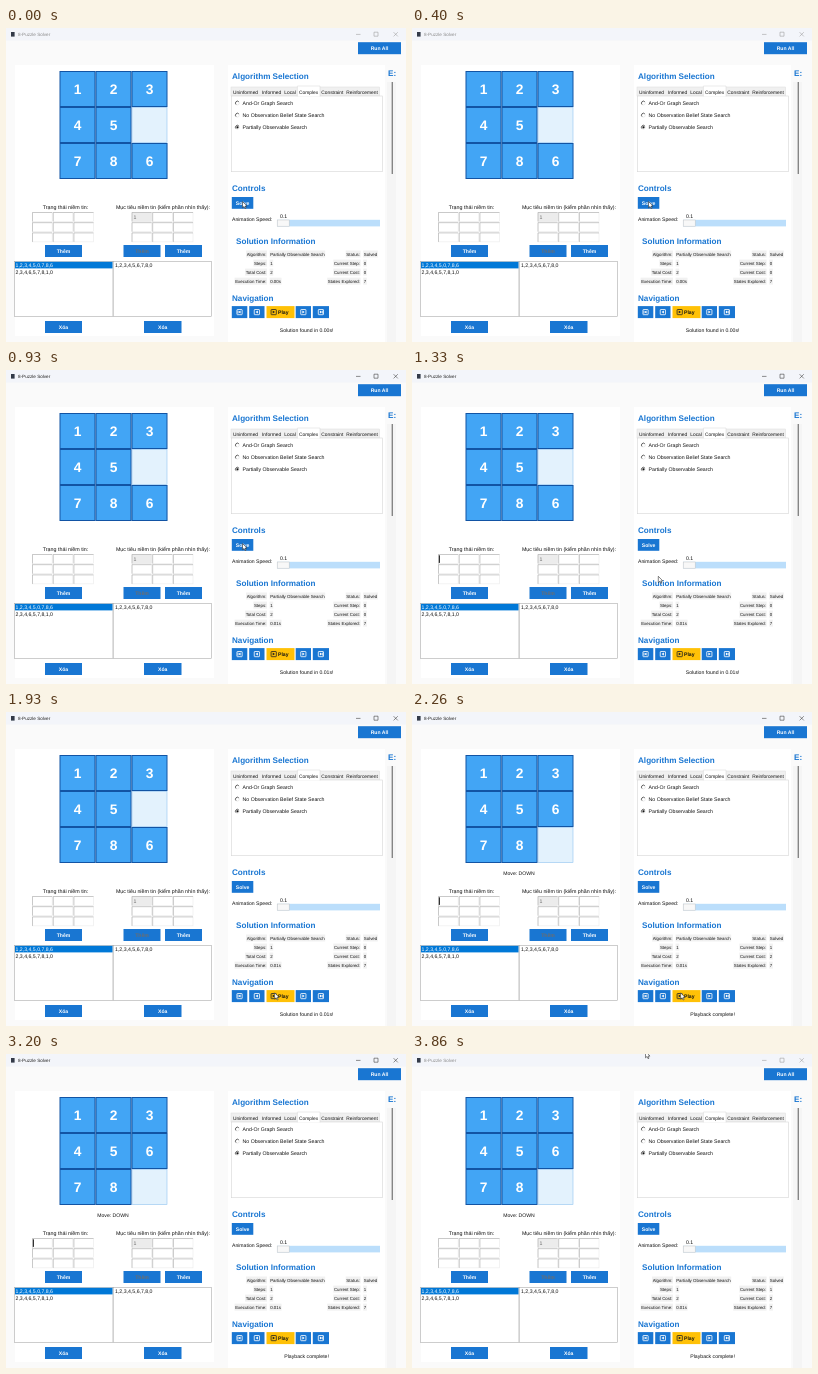
Animation, 400 px wide and 314 px high, one loop 3930 ms. Source, as an HTML page:

```html
<!DOCTYPE html>
<html lang="vi">
<head>
<meta charset="utf-8">
<title>8-Puzzle Solver</title>
<style>
  html, body { margin: 0; width: 100%; height: 100%; overflow: hidden; background: #fafafa; }
  svg { display: block; width: 100%; height: 100%; }
  text { font-family: "Liberation Sans", Arial, sans-serif; text-rendering: geometricPrecision; white-space: pre; }
</style>
</head>
<body>
<svg id="stage" viewBox="0 0 400 314"></svg>
<script>
const LOOP = 3930;
const BLUE = '#1976d2', INK = '#111', NAVY = '#1254a4';
const stage = document.getElementById('stage');

function add(tag, attrs, parent = stage) {
  const el = document.createElementNS('http://www.w3.org/2000/svg', tag);
  for (const key in attrs) el.setAttribute(key, attrs[key]);
  parent.appendChild(el);
  return el;
}
const rect = (x, y, width, height, fill, more = {}, parent) =>
  add('rect', { x, y, width, height, fill, ...more }, parent);
const path = (d, more, parent) => add('path', { d, fill: 'none', ...more }, parent);

function label(str, x, y, { size = 5.2, fill = INK, anchor = 'start', weight = 400 } = {}, parent) {
  const el = add('text', { x, y, fill, 'font-size': size, 'text-anchor': anchor, 'font-weight': weight }, parent);
  el.textContent = str;
  return el;
}
const heading = (str, x, y) => label(str, x, y, { size: 8.15, fill: BLUE, weight: 700 });

function button(str, x, y, w, h = 12, fill = '#fff') {
  rect(x, y, w, h, BLUE);
  label(str, x + w / 2, y + h / 2 + 1.8, { size: 5.1, fill, anchor: 'middle', weight: 700 });
}

// Title bar
rect(0, 0, 400, 12.5, '#f3f5fa');
rect(5, 4, 3.6, 4.6, '#333a48');
const title = label('8-Puzzle Solver', 12, 8.2, { size: 4.6 });
const winIcons = path('M350 6.4h4.5M368 4.2h4v4h-4zM387.6 4.2l4.2 4.2M391.8 4.2l-4.2 4.2', { 'stroke-width': .55 });

// Panels
rect(9, 37, 199, 271, '#fff');
rect(222, 37, 157, 277, '#fff');
button('Run All', 352, 14.2, 43, 12);
heading('E:', 382, 48.4);
rect(381, 54, 9, 260, '#f5f5f5');
rect(385.6, 54, 1.4, 92, '#858585');

// Board
const cell = n => [54 + (n % 3) * 36, 43.5 + Math.floor(n / 3) * 36];
for (const n of [5, 8]) rect(...cell(n), 35, 35, '#e3f2fd', { stroke: '#90c4f0', 'stroke-width': .6 });
function tile(n, value) {
  const g = add('g', {});
  const [x, y] = cell(n);
  rect(x, y, 35, 35, '#42a5f5', { stroke: NAVY, 'stroke-width': 1 }, g);
  label(value, x + 17.5, y + 22.4, { size: 13.8, fill: '#fff', anchor: 'middle', weight: 700 }, g);
  return g;
}
[1, 2, 3, 4, 5, 0, 7, 8].forEach((v, n) => v && tile(n, v));
const sixUp = tile(5, 6), sixDown = tile(8, 6);
const moveText = label('Move: DOWN', 107, 163, { size: 5.1, anchor: 'middle' });

// Belief state entries
label('Trạng thái niềm tin:', 59.5, 181, { size: 5.35, anchor: 'middle' });
label('Mục tiêu niềm tin (kiểm phần nhìn thấy):', 157, 181, { size: 5.3, anchor: 'middle' });
function entries(x0) {
  for (let i = 0; i < 9; i++) {
    const x = x0 + (i % 3) * 20.7, y = 184.5 + Math.floor(i / 3) * 10.2;
    const locked = x0 > 100 && i === 0;
    rect(x, y, 19.6, 9, locked ? '#ececec' : '#fff', { stroke: '#e6e6e6', 'stroke-width': .5 });
    path(`M${x} ${y + 9}v-9h19.6`, { stroke: '#a8a8a8', 'stroke-width': .55 });
  }
}
entries(26.5);
entries(126);
label('1', 127.6, 190.7, { fill: '#666' });
const caret = rect(26.9, 185.3, .9, 7.6, '#000');

button('Thêm', 39, 217, 37);
button('Thêm', 117.5, 217, 37, 12, '#6d6d6d');
button('Thêm', 159, 217, 37);
for (const x of [8.5, 107.2]) rect(x, 233.3, 98.5, 55, '#fff', { stroke: '#a5a5a5', 'stroke-width': .55 });
rect(9, 233.8, 97.5, 6.6, '#0078d7');
label('1,2,3,4,5,0,7,8,6', 9.5, 238.9, { fill: '#fff' });
label('2,3,4,6,5,7,8,1,0', 9.5, 245.5);
label('1,2,3,4,5,6,7,8,0', 109, 238.9);
button('Xóa', 39, 293, 37);
button('Xóa', 138, 293, 37.5);

// Algorithm selection
heading('Algorithm Selection', 226, 51);
rect(225, 59, 148.5, 9, '#f0f0f0', { stroke: '#dcdcdc', 'stroke-width': .5 });
rect(225.3, 68, 151.2, 75.7, '#fff', { stroke: '#d6d6d6', 'stroke-width': .6 });
path('M291.4 68.4v-10.4h22.6v10.4', { fill: '#fff', stroke: '#d6d6d6', 'stroke-width': .5 });
[['Uninformed', 227], ['Informed', 256], ['Local', 278.3], ['Complex', 293], ['Constraint', 315.3], ['Reinforcement', 340.3]]
  .forEach(([str, x]) => label(str, x, 65.6, { size: 4.85 }));
['And-Or Graph Search', 'No Observation Belief State Search', 'Partially Observable Search'].forEach((str, i) => {
  const y = 75.1 + i * 12.1;
  add('circle', { cx: 231.4, cy: y, r: 1.9, fill: '#fff', stroke: '#d8d8d8', 'stroke-width': .5 });
  path(`M230 ${y + 1.4}a1.98 1.98 0 0 1 2.8 -2.8`, { stroke: '#444', 'stroke-width': .8 });
  if (i === 2) add('circle', { cx: 231.5, cy: y, r: 1.1, fill: '#111' });
  label(str, 236.6, y + 1.9);
});

// Controls
heading('Controls', 226, 163);
button('Solve', 225.8, 169, 21.5, 11.8);
label('Animation Speed:', 226, 193, { size: 5.1 });
label('0.1', 274, 189.8);
rect(271, 191.8, 103, 6.6, '#bbdefb');
rect(271.2, 192, 12, 6.2, '#f8f8f8', { stroke: '#c4c4c4', 'stroke-width': .5 });

// Solution information
heading('Solution Information', 230, 215.6);
function statText(str, x, y, anchor) {
  const bg = rect(0, y - 5.2, 0, 7, '#f1f1f1');
  const el = label(str, x, y, { size: 4.4, anchor });
  const w = el.getComputedTextLength();
  bg.setAttribute('x', (anchor === 'end' ? x - w : x) - .6);
  bg.setAttribute('width', w + 1.2);
  return el;
}
function stat(name, value, right, row) {
  const y = 227.7 + row * 9.05;
  statText(name, right, y, 'end');
  return statText(value, right + 3.8, y, 'start');
}
stat('Algorithm:', 'Partially Observable Search', 260.4, 0);
stat('Steps:', '1', 260.4, 1);
stat('Total Cost:', '2', 260.4, 2);
const execTime = stat('Execution Time:', '0.00s', 260.4, 3);
stat('Status:', 'Solved', 354, 0);
const step = stat('Current Step:', '0', 354, 1);
const cost = stat('Current Cost:', '0', 354, 2);
stat('States Explored:', '7', 354, 3);

// Navigation
heading('Navigation', 226, 273.2);
function navButton(x, w, kind, fill = BLUE, ink = '#fff') {
  rect(x, 278.1, w, 12, fill);
  const cx = kind === 'play' ? x + 7.2 : x + w / 2, cy = 284.1;
  rect(cx - 2.6, cy - 2.6, 5.2, 5.2, 'none', { stroke: ink, 'stroke-width': .8, rx: .5 });
  const dir = kind === 'first' || kind === 'back' ? -1 : 1;
  path(`M${cx - dir} ${cy - 1.5}l${2.3 * dir} 1.5l${-2.3 * dir} 1.5z`, { fill: ink });
  if (kind === 'first' || kind === 'last') path(`M${cx + 1.6 * dir} ${cy - 1.5}v3`, { stroke: ink, 'stroke-width': .7 });
}
navButton(225.8, 15.5, 'first');
navButton(243.2, 15.3, 'back');
navButton(260.5, 28, 'play', '#ffc107', '#222');
label('Play', 272, 286, { size: 5.1, weight: 700 });
navButton(289.7, 15.3, 'next');
navButton(306.8, 16.2, 'last');
const message = label('', 300.6, 304, { size: 5.15, anchor: 'middle' });

const pointer = path('M0 0v6.3l1.5-1.3 1 2.2 1-.5-1-2.1h2z', { fill: '#fff', stroke: '#222', 'stroke-width': .55 });

// Pointer stops: time, x, y
const stops = [
  [1140, 236.5, 173.5], [1660, 268.6, 280.8], [2600, 268.6, 280.8],
  [3060, 238, 130], [3180, 238, 120], [3530, 233.5, -2.5]
];
function pointerAt(t) {
  const i = stops.findIndex(s => t < s[0]);
  if (i === 0) return stops[0].slice(1);
  if (i < 0) return stops[stops.length - 1].slice(1);
  const [t0, x0, y0] = stops[i - 1], [t1, x1, y1] = stops[i];
  const p = (t - t0) / (t1 - t0), e = p * p * (3 - 2 * p);
  return [x0 + (x1 - x0) * e, y0 + (y1 - y0) * e];
}

const show = (el, on) => el.setAttribute('visibility', on ? 'visible' : 'hidden');
const within = (t, a, b) => t >= a && t < b;

function draw(t) {
  const active = within(t, 930, 3860), moved = t >= 2000;
  const time = t < 930 ? '0.00s' : '0.01s';
  title.setAttribute('fill', active ? '#222' : '#8b8b8b');
  winIcons.setAttribute('stroke', active ? '#333' : '#999');
  show(sixDown, !moved);
  show(sixUp, moved);
  show(moveText, moved);
  show(caret, within(t, 1060, 1600) || within(t, 1990, 2660) || within(t, 3000, 3470));
  show(pointer, !within(t, 3060, 3260));
  execTime.textContent = time;
  step.textContent = moved ? '1' : '0';
  cost.textContent = moved ? '2' : '0';
  message.textContent = moved ? 'Playback complete!' : `Solution found in ${time}!`;
  pointer.setAttribute('transform', `translate(${pointerAt(t)})`);
}

const start = performance.now();
function frame() {
  draw((performance.now() - start) % LOOP);
  requestAnimationFrame(frame);
}
frame();
</script>
</body>
</html>
```
